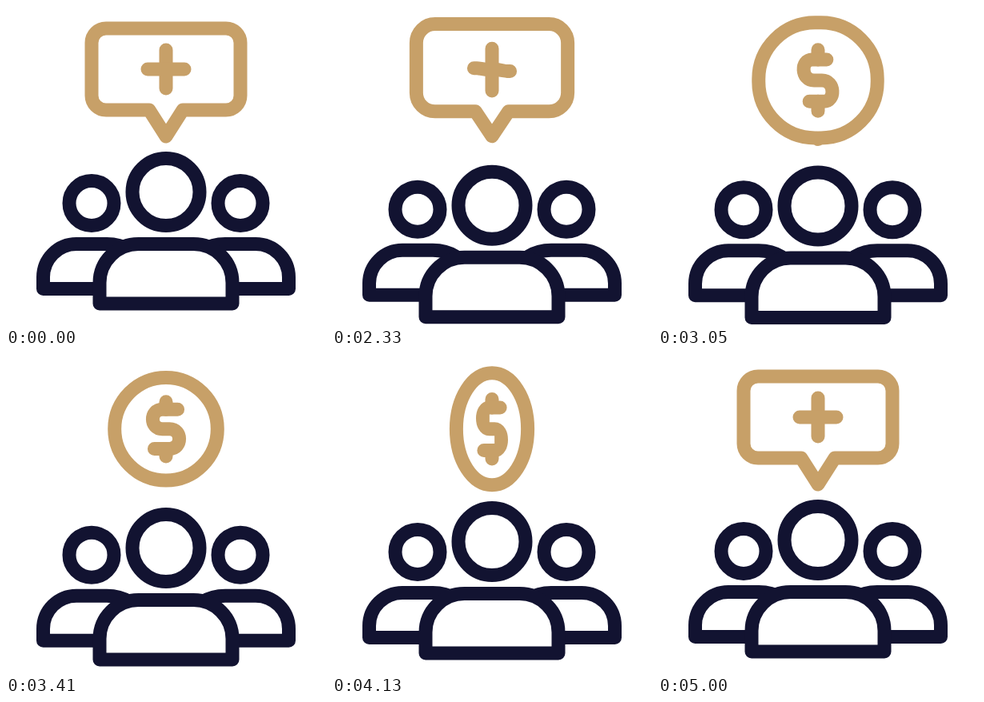
These frames come from a looping animation (400 by 400 pixels, 5030 ms). An HTML page:

```html
<!DOCTYPE html>
<html lang="en">
<head>
<meta charset="utf-8">
<title>Team message and coin</title>
<style>
  html, body { margin: 0; width: 100%; height: 100%; overflow: hidden; background: #fff; }
  svg { display: block; width: 100vw; height: 100vh; }
  path, circle { fill: none; stroke-width: 17; stroke-linecap: round; stroke-linejoin: round; }
  .people { stroke: #121331; }
  .front path { fill: #fff; }
  .gold { stroke: #c7a068; }
</style>
</head>
<body>
<svg viewBox="0 0 400 400">
  <defs>
    <g id="side">
      <circle cx="107" cy="246.5" r="28"/>
      <path d="M117 353.5H46.5V339A41.5 41.5 0 0 1 88 297.5H126Q142 297.5 154 305"/>
    </g>
  </defs>
  <g class="people">
    <g id="sides">
      <use href="#side"/>
      <use href="#side" transform="matrix(-1 0 0 1 400 0)"/>
    </g>
    <g id="front" class="front">
      <circle cx="200" cy="232.5" r="42"/>
      <path d="M117 372V346A48.5 48.5 0 0 1 165.5 297.5H234.5A48.5 48.5 0 0 1 283 346V372Z"/>
    </g>
  </g>
  <g class="gold">
    <path id="frame"/>
    <path id="bar"/>
    <path id="curl"/>
  </g>
</svg>
<script>
const LOOP = 5030, START = 2030, STEP = 30, FLIP = 4340;
const CX = 200, KAPPA = 0.5523;
const el = id => document.getElementById(id);
const mix = (a, b, k) => a + (b - a) * k;
const unit = (t, from, to) => Math.min(1, Math.max(0, (t - from) / (to - from)));
const smooth = k => k * k * (3 - 2 * k);

// cubic-bezier(.33, 0, .2, 1)
function settle(x) {
  let lo = 0, hi = 1;
  for (let i = 0; i < 30; i++) {
    const s = (lo + hi) / 2, q = 1 - s;
    if (0.99 * s * q * q + 0.6 * s * s * q + s * s * s < x) lo = s; else hi = s;
  }
  return smooth(lo);
}

// half width, top, bottom, corner, tail half width, tail tip, bar top, bar bottom, morph
const REST = [93, 28, 130, 18, 21, 163, 55, 103, 0];
const KEYS = [
  [2030, [91, 30.5, 130, 21, 21, 162.5, 58, 103, 0.04]],
  [2555, [97, 17.5, 133, 25, 20.5, 163, 50, 108, 0.1]],
  [2750, [95, 20, 133, 27.5, 20, 161, 52, 110, 0.19]],
  [3100, coin(73)],
  [3410, coin(64.3)],
  [3900, coin(73)],
  [4130, coin(70)],
  [FLIP, coin(66)]
];

function coin(r) {
  const cy = 93.8, half = 34 * r / 64;
  return [r, cy - r, cy + r, r, 0, cy + r, cy - half, cy + half, 1];
}

function poseAt(t) {
  if (t < START || t >= FLIP) return REST;
  const i = KEYS.findIndex(key => key[0] > t);
  const [t0, a] = KEYS[i - 1], [t1, b] = KEYS[i];
  const k = smooth(unit(t, t0, t1));
  return a.map((v, n) => mix(v, b[n], k));
}

function framePath([w, top, bottom, r, d, tip], sx) {
  const p = (x, y) => `${(CX + x * sx).toFixed(2)} ${y.toFixed(2)} `;
  const c = r * (1 - KAPPA);
  return 'M' + p(r - w, top) + 'L' + p(w - r, top) +
    'C' + p(w - c, top) + p(w, top + c) + p(w, top + r) +
    'L' + p(w, bottom - r) +
    'C' + p(w, bottom - c) + p(w - c, bottom) + p(w - r, bottom) +
    'L' + p(d, bottom) + 'L' + p(0, tip) + 'L' + p(-d, bottom) + 'L' + p(r - w, bottom) +
    'C' + p(c - w, bottom) + p(-w, bottom - c) + p(-w, bottom - r) +
    'L' + p(-w, top + r) +
    'C' + p(-w, top + c) + p(c - w, top) + p(r - w, top) + 'Z';
}

// First half of the curl: x as a flat line, x and y as a dollar sign.
const REACH = 24.5;
const HALF = [[-23, 14.5, -REACH], [-19, -4.5, -REACH], [-16, -20.5, -REACH], [-10, -20.5, 0], [-4, -4.5, 0]];

function drawGlyph(top, bottom, m, sx) {
  const cy = (top + bottom) / 2;
  const size = mix(1, (bottom - top) / 68, m);
  const half = HALF.map(([x0, x1, y]) => [mix(x0, x1, m ** 3) * size, y * m * size]);
  const all = half.concat(half.map(([x, y]) => [-x, -y]).reverse());
  const p = all.map(([x, y]) => `${(CX + x * sx).toFixed(2)} ${(cy + y).toFixed(2)} `);
  el('curl').setAttribute('d', `M${p[0]}L${p[1]}C${p[2]}${p[3]}${p[4]}L${p[5]}C${p[6]}${p[7]}${p[8]}L${p[9]}`);

  // The bar splits into two stubs as the curl opens.
  const gap = REACH * m * size;
  el('bar').setAttribute('d', `M${CX} ${top}V${cy - gap}M${CX} ${cy + gap}V${bottom}`);
}

function dropAt(t) {
  if (t < START) return 0;
  const peak = 2627;
  return 20.5 * (t < peak ? settle(unit(t, 2000, peak)) : 1 - settle(unit(t, peak, 5000)));
}

function draw(t) {
  const pose = poseAt(t);
  const [top, bottom, m] = pose.slice(6);
  const sx = Math.abs(Math.cos(Math.PI * smooth(unit(t, 3640, 5045))));
  el('frame').setAttribute('d', framePath(pose, t < START ? 1 : sx));
  drawGlyph(top, bottom, m, sx);

  const drop = dropAt(t);
  el('front').setAttribute('transform', `translate(0 ${drop})`);
  el('sides').setAttribute('transform', `translate(0 ${drop * 0.465})`);
}

const began = performance.now();
function tick() {
  const t = (performance.now() - began) % LOOP;
  draw(t < START ? 0 : START + Math.floor((t - START) / STEP) * STEP);
  requestAnimationFrame(tick);
}
tick();
</script>
</body>
</html>
```
